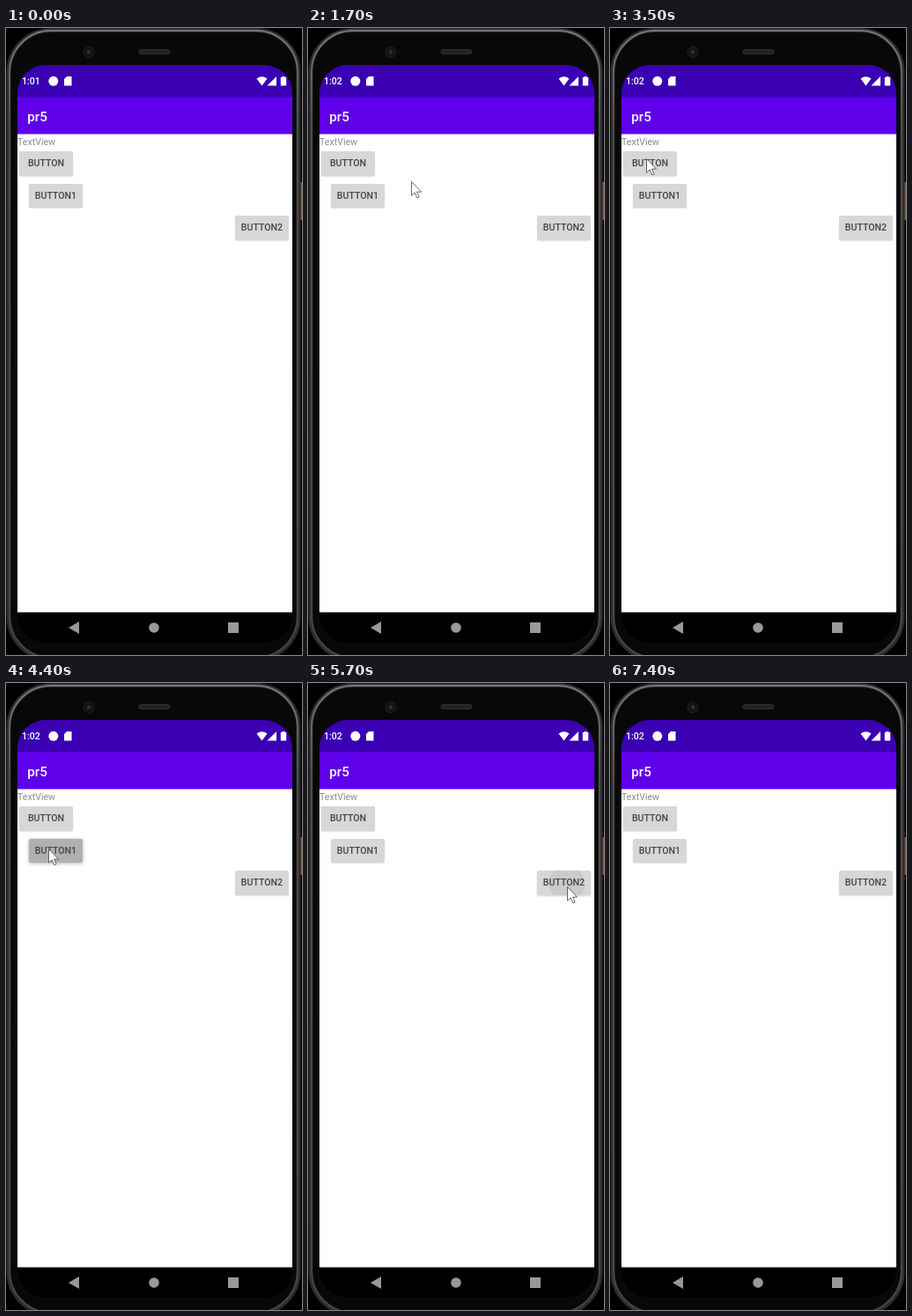
An HTML page that plays this animation: 336x712 px, repeating every 8300 ms.

```html
<!DOCTYPE html>
<html lang="en">
<head>
<meta charset="utf-8">
<title>pr5</title>
<style>
html, body { margin: 0; width: 100%; height: 100%; overflow: hidden; background: #000; }
svg { position: absolute; left: 0; top: 0; }
text { font-family: Roboto, sans-serif; }
.btn {
  position: absolute; width: 61px; height: 27.5px; border-radius: 2px;
  font: 500 10.6px/28px Roboto, sans-serif; text-align: center; color: #444546;
}
</style>
</head>
<body>
<svg width="336" height="712" viewBox="0 0 336 712">
  <defs>
    <clipPath id="screen"><rect x="13" y="42" width="312" height="656" rx="32"/></clipPath>
    <linearGradient id="rim" x2="0" y2="1">
      <stop offset="0" stop-color="#777"/>
      <stop offset=".15" stop-color="#4c4d4d"/>
      <stop offset="1" stop-color="#444646"/>
    </linearGradient>
  </defs>
  <!-- phone body -->
  <rect x="3" y="2.500" width="329" height="714" rx="48" fill="#080808" stroke="#2c2d2d" stroke-width="5"/>
  <rect x="4" y="3" width="327" height="712" rx="47" fill="none" stroke="url(#rim)" stroke-width="2"/>
  <rect x="334.500" y="175" width="1.500" height="43" fill="#a84c48"/>
  <circle cx="94" cy="27.500" r="6" fill="#111214" stroke="#222326"/>
  <circle cx="94" cy="27.500" r="2.200" fill="#303238"/>
  <rect x="151" y="24.500" width="35" height="5" rx="2.500" fill="#222" stroke="#303030"/>
  <!-- screen -->
  <g clip-path="url(#screen)">
    <rect x="13" y="42" width="312" height="37" fill="#3a00b2"/>
    <rect x="13" y="78.500" width="312" height="43" fill="#6000ea"/>
    <rect x="13" y="663" width="312" height="35" fill="#000"/>
    <rect x="13" y="120.500" width="312" height="543" fill="#fff"/>
  </g>
  <g fill="#fff">
    <text id="clock" x="18" y="64.300" font-size="10.6" font-weight="500">1:01</text>
    <circle cx="53.800" cy="60.300" r="5.500"/>
    <path d="M69 55h5.500v10.500h-8.500v-7.500z"/>
    <path d="M284.500 57.500q6-4.600 12 0l-6 8z"/>
    <path d="M307 55v10.500h-10.500z"/>
    <path d="M313.500 55h3v1h1.700v9.500h-6.400v-9.500h1.700z"/>
    <text x="24.300" y="106" font-size="15.2" font-weight="500">pr5</text>
  </g>
  <text x="13" y="132.600" font-size="10.6" fill="#8a8a8a">TextView</text>
  <g fill="#999">
    <path d="M71 681l12-7v14z"/>
    <circle cx="168" cy="681" r="5.800"/>
    <rect x="252" y="675" width="12" height="12"/>
  </g>
</svg>
<div class="btn" style="left:15px;top:140px">BUTTON</div>
<div class="btn" style="left:26px;top:176.5px">BUTTON1</div>
<div class="btn" style="left:260px;top:213px">BUTTON2</div>
<svg width="336" height="712" viewBox="0 0 336 712">
  <path id="cursor" d="M.5 .5v15.700l3.700-3.300 2.600 5.900 2.300-1-2.600-5.700h5z" fill="#fff" stroke="#555" stroke-width=".9"/>
</svg>
<script>
const LOOP = 8300, STEP = 100;
const clock = document.getElementById('clock');
const cursor = document.getElementById('cursor');
const buttons = [...document.querySelectorAll('.btn')];

// Pointer glides: evenly timed key points, then rest until the next glide
const glides = [
  { from: 1300, to: 2100, points: [[66, 277], [117, 174], [20, 114]] },
  { from: 2100, to: 2800, points: [[20, 114], [41, 148]] },
  { from: 3700, to: 4000, points: [[41, 148], [48, 188]] },
  { from: 4400, to: 5200, points: [[48, 188], [190, 181], [290, 221]] },
  { from: 5200, to: 5600, points: [[290, 221], [294, 231]] },
  { from: 6100, to: 7300, points: [[294, 231], [190, 185], [95, 355], [292, 391], [325, 376]] }
];

// One per button: ripple spreads from start, fills the button at full, then fades
const presses = [
  { start: 3100, full: 3300, x: 27, y: 9 },
  { start: 4400, full: 4400, x: 22, y: 12 },
  { start: 5700, full: 5800, x: 34, y: 15 }
];

function moveCursor(t) {
  const glide = glides.findLast(g => g.from <= t);
  const visible = glide && t < 7400;
  cursor.style.display = visible ? '' : 'none';
  if (!visible) return;
  const { from, to, points } = glide;
  const pos = Math.min(1, (t - from) / (to - from)) * (points.length - 1);
  const i = Math.min(Math.floor(pos), points.length - 2);
  const at = n => points[i][n] + (points[i + 1][n] - points[i][n]) * (pos - i);
  cursor.setAttribute('transform', `translate(${at(0)} ${at(1)})`);
}

function paintButton(button, { start, full, x, y }, t) {
  const spreading = t < full;
  const alpha = t < start ? 0 : spreading ? .06 : .18 * Math.max(0, 1 - (t - full) / 200);
  const r = spreading ? 20 + (t - start) * .16 : 80;
  button.style.background =
    `radial-gradient(circle at ${x}px ${y}px, rgba(0,0,0,${alpha}) ${r}px, transparent ${r + 1}px) #d6d7d7`;
  button.style.boxShadow = `0 1px ${1.5 + alpha * 15}px rgba(0,0,0,${.12 + alpha})`;
}

function draw(now) {
  const t = Math.floor(now % LOOP / STEP) * STEP;
  clock.textContent = t < 400 ? '1:01' : '1:02';
  moveCursor(t);
  buttons.forEach((b, i) => paintButton(b, presses[i], t));
  requestAnimationFrame(draw);
}
draw(0);
</script>
</body>
</html>
```
